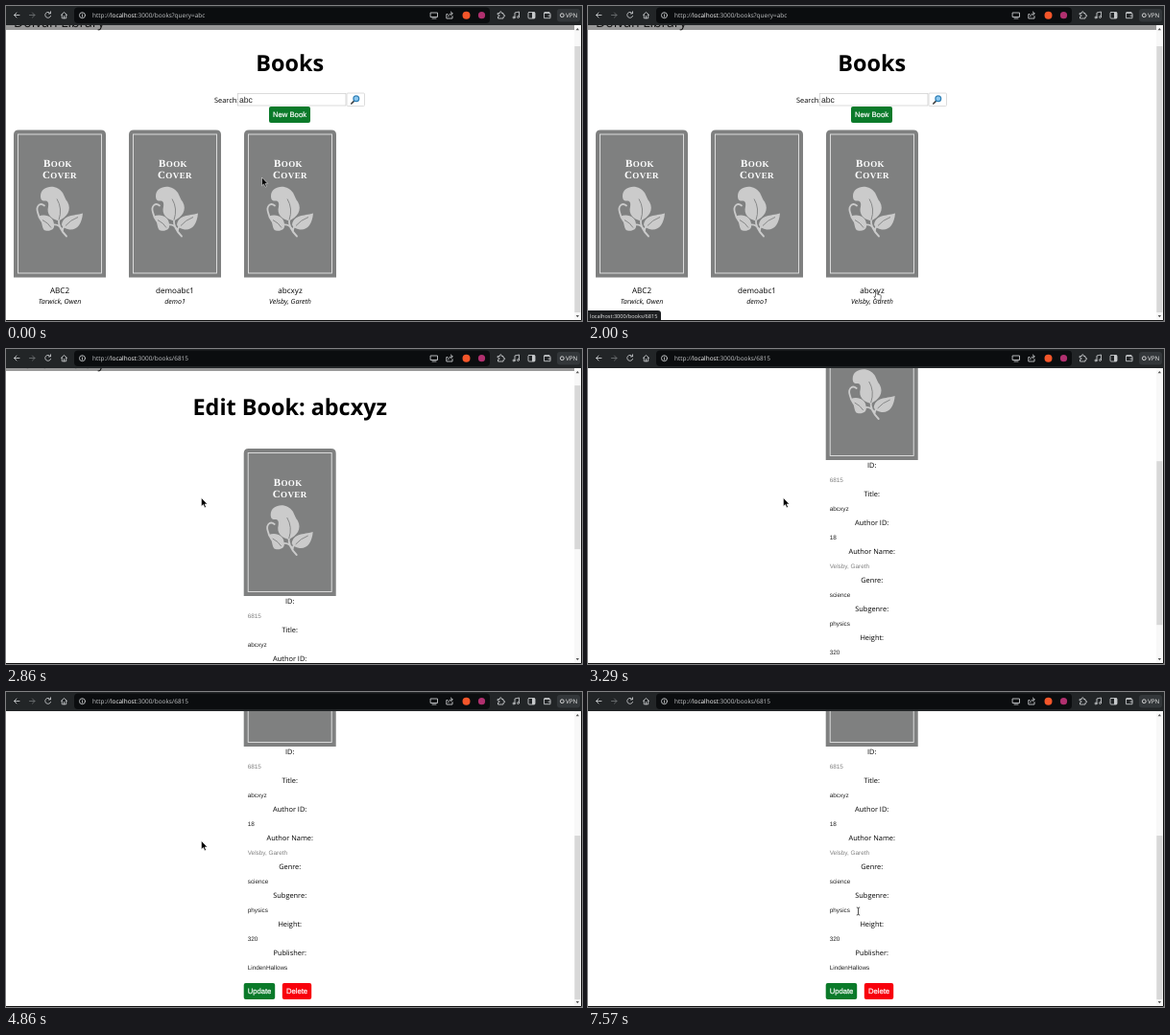
Recreate the animation shown at these times as an HTML page. Size 600 px wide and 329 px high, loop 8 s.

```html
<!DOCTYPE html>
<html lang="en">
<head>
<meta charset="utf-8">
<title>Library</title>
<style>
  html, body { margin: 0; width: 100%; height: 100%; overflow: hidden; background: #fff; }
  svg { display: block; width: 100vw; height: 100vh; }
  text { font-family: "Open Sans", "Noto Sans", sans-serif; text-rendering: geometricPrecision; white-space: pre; }
  .arial { font-family: "Liberation Sans", Arial, sans-serif; }
  .mid { text-anchor: middle; }
  .heading { font-size: 23.4px; font-weight: 700; }
  .label { font-size: 7.4px; }
  .value { font-size: 6.4px; fill: #222; }
  .disabled { fill: #808080; }
  .name { font-size: 8.1px; }
  .author { font-size: 7.1px; font-style: italic; }
  .button { font-size: 7.68px; fill: #fff; stroke: #fff; stroke-width: .2; }
  .cover-text { font: 700 9px "Liberation Serif", "Noto Serif", serif; fill: #fff; letter-spacing: .4px; }
  .cover-text .cap { font-size: 11px; }
  .icon { fill: none; stroke: #c6c8ca; stroke-width: .9; stroke-linecap: round; stroke-linejoin: round; }
</style>
</head>
<body>
<svg viewBox="0 0 600 329" preserveAspectRatio="none">
  <defs>
    <g id="cover">
      <path d="M0 154V5Q0 0 5 0H91Q96 0 96 5V154Z" fill="#7f8080"/>
      <rect x="4.5" y="4.5" width="87" height="145" fill="none" stroke="#e4e4e4" stroke-width=".9"/>
      <text class="cover-text" x="31" y="38.5"><tspan class="cap">B</tspan>OOK</text>
      <text class="cover-text" x="30" y="50.5"><tspan class="cap">C</tspan>OVER</text>
      <g fill="#cbcbcb">
        <path d="M28 69C28 60 39 57 46 61C53 65 52 70 56 75C61 84 55 91 47 95C39 93 34 88 36 80C37 74 34 74 32 74C29 74 28 72 28 69Z"/>
        <path d="M26 90C34 87 42 91 42 99C43 104 38 106 33 105C29 104 31 98 26 90Z"/>
        <path d="M50 99C52 88 62 90 72 87C71 98 66 105 58 104C54 103 51 102 50 99Z"/>
      </g>
      <g fill="none" stroke="#cbcbcb" stroke-width="1.8" stroke-linecap="round">
        <path d="M32 79C27 75 23 80 25 86Q26 91 29 95M38 100C45 97 49 101 51 105M47 93C46 101 51 107 55 111M51 105Q51 101 55 99"/>
      </g>
      <path d="M45 72Q51 82 47 94M30 94Q36 97 39 102M67 91Q59 94 54 100" fill="none" stroke="#7f8080" stroke-width=".9"/>
    </g>
    <g id="header">
      <rect y="0" width="592" height="25" fill="#999"/>
      <text x="8" y="22" font-size="14" fill="#111">Dolvan Library</text>
    </g>
  </defs>

  <rect width="600" height="329" fill="#fff"/>

  <g id="listPage">
    <use href="#header"/>
    <text class="heading mid" x="295.7" y="68">Books</text>
    <text class="label" x="217" y="100.6">Search:</text>
    <rect x="241.5" y="91.5" width="112.5" height="12.5" fill="#fff" stroke="#ccc" stroke-width=".7"/>
    <text class="arial" x="243" y="100.5" font-size="8.6" fill="#222">abc</text>
    <rect x="355" y="91" width="18.5" height="13.5" rx="1" fill="#fff" stroke="#d4d4d4" stroke-width=".8"/>
    <path d="M362.4 99.3L359.8 102" stroke="#444" stroke-width="1.7" stroke-linecap="round"/>
    <circle cx="364.8" cy="96.8" r="2.9" fill="#8cc8f0" stroke="#2f7fb5" stroke-width="1.2"/>
    <rect x="274" y="105" width="43" height="17" rx="2" fill="#0b7a2a"/>
    <text class="button arial mid" x="295.5" y="116.2">New Book</text>
  </g>

  <g id="editPage">
    <use href="#header"/>
    <text class="heading mid" x="295.7" y="71.3">Edit Book: abcxyz</text>
    <use href="#cover" x="247.7" y="106"/>
    <rect x="247.7" y="507" width="32.5" height="17" rx="2" fill="#0b7a2a"/>
    <text class="button arial mid" x="264" y="518.3">Update</text>
    <rect x="287.8" y="507" width="30.4" height="17" rx="2" fill="#f8000c"/>
    <text class="button arial mid" x="303" y="518.3">Delete</text>
  </g>

  <rect x="592" y="20" width="7" height="309" fill="#f8f8f8"/>
  <rect id="thumb" x="592.3" width="6" fill="#d8d8d8"/>
  <path d="M593.6 25.3L595.3 23L597 25.3ZM593.6 323L595.3 325.3L597 323Z" fill="#555"/>

  <g id="status">
    <path d="M0 329V318H73Q76 318 76 321V329Z" fill="#1d1f21"/>
    <text x="2" y="325.6" font-size="5.6" fill="#e8e8e8">localhost:3000/books/6815</text>
  </g>
  <path d="M599.5 20V328.5H0" fill="none" stroke="#111"/>

  <g id="toolbar">
    <rect width="600" height="20" fill="#222527"/>
    <rect x="71" y="1.5" width="433" height="16.5" rx="4" fill="#0b0d0f"/>
    <g class="icon">
      <path d="M14 9.5H8.5M11 7L8.5 9.5L11 12"/>
      <path d="M24.5 9.5H30M27.500 7L30 9.500L27.500 12" stroke="#6d7072"/>
      <path d="M46.300 7.700A3 3 0 1 0 46.600 10.500M46.500 5.800V7.900H44.400"/>
      <path d="M57.500 9.300L60.500 6.500L63.500 9.300M58.300 9V12.800H62.700V9M60.500 12.800V10.500"/>
      <circle cx="79.500" cy="9.700" r="3"/>
      <path d="M79.500 9.500V11.200M79.500 8.100V8.200"/>
      <path d="M442.500 7H449.500V11.500H442.500ZM444 13H448"/>
      <path d="M460 8.500H458.800V13H465V10.500M460.800 10.800Q461 7.800 465 7.800M463.300 6L465.200 7.800L463.300 9.600"/>
      <path d="M512.500 7.500H514.300Q514 5.800 515.300 5.800T516.300 7.500H518V9.200Q519.600 9 519.600 10.200T518 11.300V13H512.500V11Q514.200 11 514.200 10T512.500 9Z"/>
      <path d="M530 12V7L534.500 6V11.300"/>
      <circle cx="529" cy="12" r="1"/><circle cx="533.500" cy="11.500" r="1"/>
      <rect x="544" y="6.500" width="7" height="6.500" rx="1"/>
      <path d="M560.500 7.500H566V6.500H561Q560.500 6.500 560.500 7.500V12.700H567V7.700H566M565 10.200H567"/>
    </g>
    <rect x="548" y="6.500" width="3" height="6.500" fill="#c6c8ca"/>
    <circle cx="479.500" cy="9.700" r="4" fill="#f4562a"/>
    <circle cx="495.500" cy="9.700" r="3.600" fill="#b0306f"/>
    <rect x="574" y="3" width="24" height="13.500" rx="3" fill="#33373a"/>
    <circle cx="579.300" cy="9.700" r="1.900" fill="none" stroke="#d8d8d8" stroke-width="1"/>
    <text x="583" y="12" font-size="6.300" fill="#eee">VPN</text>
    <text x="90" y="12" font-size="6.450" fill="#c4c6c8">http://<tspan fill="#fff">localhost</tspan>:3000/<tspan id="path"></tspan></text>
  </g>

  <g id="cursor">
    <path id="arrow" d="M0 0V8.700L2 6.900L3.500 10.200L4.900 9.600L3.500 6.400H6.200Z" fill="#000" stroke="#fff" stroke-width=".5"/>
    <path id="hand" d="M0 .8Q.9 -.3 1.600 .8V4L5 4.800Q5.900 5.100 5.800 6L5.300 10.300H1L-1.500 6.800Q-1.400 5.600 0 6.500Z" fill="#fff" stroke="#222" stroke-width=".6"/>
    <path id="beam" d="M-1.700 -4Q-.2 -4 0 -3.200Q.2 -4 1.700 -4M0 -3.200V3.200M-1.700 4Q-.2 4 0 3.200Q.2 4 1.700 4" fill="none" stroke="#222" stroke-width=".8"/>
  </g>
</svg>

<script>
const LOOP = 8000;
const $ = id => document.getElementById(id);

function add(parent, tag, attrs, text = "") {
  const node = document.createElementNS("http://www.w3.org/2000/svg", tag);
  for (const key in attrs) node.setAttribute(key, attrs[key]);
  node.textContent = text;
  parent.append(node);
}

const books = [["ABC2", "Tarwick, Owen"], ["demoabc1", "demo1"], ["abcxyz", "Velsby, Gareth"]];
books.forEach(([name, author], i) => {
  const x = 8 + 120 * i;
  add($("listPage"), "use", { href: "#cover", x, y: 129.5 });
  add($("listPage"), "text", { class: "name mid", x: x + 48, y: 300 }, name);
  add($("listPage"), "text", { class: "author mid", x: x + 48, y: 310.6 }, author);
});

const fields = [
  ["ID", "6815", true], ["Title", "abcxyz"], ["Author ID", "18"], ["Author Name", "Velsby, Gareth", true],
  ["Genre", "science"], ["Subgenre", "physics"], ["Height", "320"], ["Publisher", "LindenHallows"],
];
fields.forEach(([label, value, disabled], i) => {
  const y = 267.8 + 30 * i;
  add($("editPage"), "text", { class: "label mid", x: 295.7, y }, label + ":");
  add($("editPage"), "text", { class: "value arial" + (disabled ? " disabled" : ""), x: 251.7, y: y + 15.6 }, value);
});

// Each move runs along a quadratic curve in equal hard steps, the first at start and the last at end.
const moves = [
  { start: 570, end: 1430, steps: 7, from: [266.5, 179], via: [275, 250], to: [299.5, 297], after: "hand" },
  { start: 2430, end: 2860, steps: 4, from: [299.3, 296], via: [240, 215], to: [203.5, 155.5], after: "arrow" },
  { start: 5710, end: 6140, steps: 4, from: [203.5, 155.5], via: [275, 178], to: [333, 139], after: "beam" },
  { start: 7140, end: 7570, steps: 4, from: [333, 139], via: [310, 310], to: [281.5, 229], after: "beam" },
];

function cursorAt(t) {
  let pose = { x: 266.5, y: 179, kind: "arrow" };
  for (const { start, end, steps, from, via, to, after } of moves) {
    if (t < start) break;
    const interval = (end - start) / (steps - 1);
    const p = t >= end ? 1 : (Math.floor((t - start) / interval) + 1) / steps;
    const at = k => (1 - p) ** 2 * from[k] + 2 * p * (1 - p) * via[k] + p * p * to[k];
    pose = { x: at(0), y: at(1), kind: p === 1 ? after : "arrow" };
  }
  if (t >= 2290 && t < 2430) pose = { x: 299.3, y: 296, kind: "arrow" };
  return pose;
}

const scrollStops = [[0, 0], [2860, 2], [3290, 144], [3710, 190], [3860, 200], [4000, 203]];
const scrollAt = t => scrollStops.findLast(([time]) => t >= time)[1];
const show = (id, visible) => $(id).setAttribute("display", visible ? "inline" : "none");

function draw(t) {
  const editing = t >= 2290;
  const scroll = scrollAt(t);
  show("listPage", !editing);
  show("editPage", editing);
  show("status", t >= 1287 && t < 2710);
  $("editPage").setAttribute("transform", `translate(0 ${-scroll})`);
  $("thumb").setAttribute("y", editing ? 37 + scroll * 0.557 : 42);
  $("thumb").setAttribute("height", editing ? 171 : 278);
  $("path").textContent = editing ? "books/6815" : "books?query=abc";

  const { x, y, kind } = cursorAt(t);
  $("cursor").setAttribute("transform", `translate(${x} ${y})`);
  for (const shape of ["arrow", "hand", "beam"]) show(shape, shape === kind);
}

function tick() {
  draw(performance.now() % LOOP);
  requestAnimationFrame(tick);
}
tick();
</script>
</body>
</html>
```
